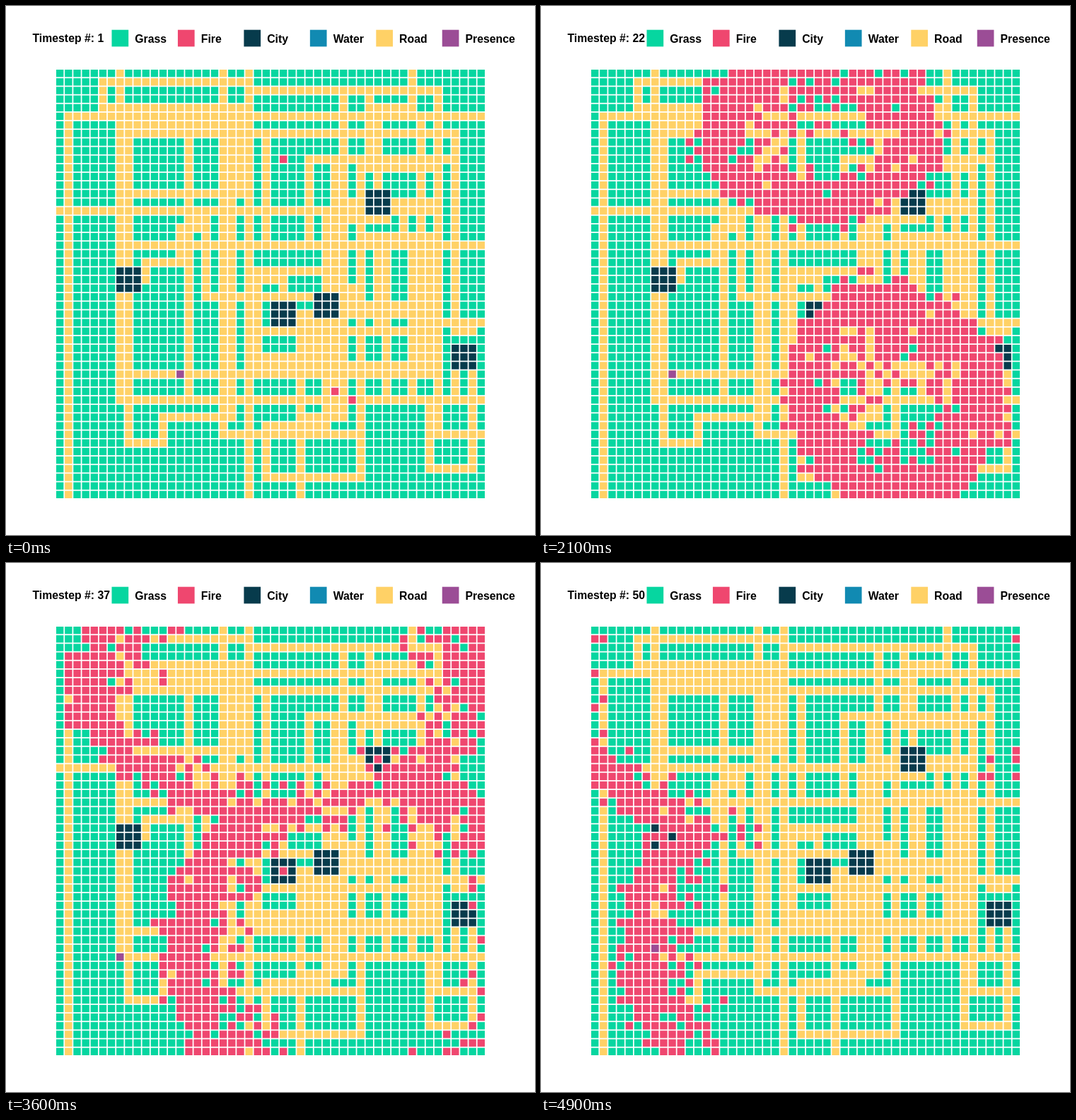
Animation of 748x748 px, one loop 5 s. Source, as an HTML page with a canvas:

```html
<!DOCTYPE html>
<html lang="en">
<head>
<meta charset="utf-8">
<title>Wildfire grid</title>
<style>
  html, body { margin: 0; width: 100%; height: 100%; overflow: hidden; background: #fff; }
  canvas { display: block; }
</style>
</head>
<body>
<canvas id="stage" width="748" height="748"></canvas>
<script>
const ctx = document.getElementById('stage').getContext('2d');
const SIZE = 50, STEP_MS = 100, STEPS = 50;
const PITCH = 12.155, CELL = 10.4, LEFT = 71, TOP = 90;
const COLORS = {
  Grass: '#06d6a0', Fire: '#ef476f', City: '#073b4c',
  Water: '#118ab2', Road: '#ffd166', Presence: '#9b4d96'
};

let state = 20517;
function random() {
  state = (state + 0x6d2b79f5) | 0;
  let x = Math.imul(state ^ (state >>> 15), 1 | state);
  x = (x + Math.imul(x ^ (x >>> 7), 61 | x)) ^ x;
  return ((x ^ (x >>> 14)) >>> 0) / 4294967296;
}
const spread = () => random() + random() - 1;
const lerp = (a, b, k) => a + (b - a) * k;

// Town map: plazas are blocks, roads run through corner points
const land = Array.from({ length: SIZE }, () => Array(SIZE).fill('Grass'));
function fill(kind, x0, y0, x1, y1) {
  for (let y = Math.min(y0, y1); y <= Math.max(y0, y1); y++)
    land[y].fill(kind, Math.min(x0, x1), Math.max(x0, x1) + 1);
}
function road(...p) {
  for (let i = 0; i + 3 < p.length; i += 2) fill('Road', p[i], p[i + 1], p[i + 2], p[i + 3]);
}
const plaza = (...box) => fill('Road', ...box);

// Through roads
road(0, 16, 44, 16);
road(1, 49, 1, 5, 49, 5);
road(7, 0, 7, 38, 49, 38);
road(7, 7, 46, 7, 46, 30, 48, 30);
road(22, 2, 44, 2, 44, 42, 49, 42);
road(19, 0, 19, 42, 35, 42, 35, 10);
road(22, 0, 22, 49);
road(7, 20, 49, 20);
road(7, 35, 44, 35);

// West side
plaza(7, 4, 22, 7);
plaza(19, 4, 21, 14);
road(5, 4, 5, 1, 22, 1);
road(5, 4, 7, 4);
road(8, 4, 8, 43, 12, 43, 12, 40, 20, 40, 20, 4);
road(15, 5, 15, 38);
road(7, 14, 22, 14);
road(15, 17, 17, 17, 17, 26, 35, 26);
road(14, 21, 14, 18, 17, 18);
road(10, 24, 10, 22, 15, 22);

// Centre
plaza(31, 16, 33, 40);
plaza(28, 28, 33, 35);
plaza(22, 33, 27, 35);
road(24, 7, 24, 20);
road(29, 20, 29, 10, 46, 10);
road(32, 16, 32, 10);
road(33, 16, 33, 2);
road(33, 23, 23, 23, 23, 35);
road(22, 23, 22, 24, 26, 24, 26, 25);
road(22, 30, 44, 30);
road(28, 33, 28, 49);
road(33, 40, 28, 40);
road(31, 42, 31, 41, 24, 41, 24, 47, 35, 47, 35, 42);

// East side
plaza(41, 19, 44, 35);
plaza(33, 27, 44, 28);
road(36, 2, 36, 11, 44, 11);
road(36, 4, 41, 4, 41, 0);
road(37, 4, 37, 17, 31, 17);
road(32, 15, 44, 15);
road(40, 15, 40, 19);
road(42, 5, 42, 19, 35, 19);
road(37, 19, 37, 30);
road(38, 15, 38, 17);
road(38, 19, 38, 38);
road(31, 25, 35, 25);
road(41, 29, 49, 29);
road(33, 34, 44, 34);
road(41, 35, 41, 38);
road(43, 38, 43, 46, 48, 46, 48, 35);
road(46, 35, 46, 38);

// Small greens inside the paved area
for (const y of [18, 21, 29, 36]) fill('Grass', 34, y, 34, y + 1);
for (const x of [21, 23]) fill('Grass', x, 17, x, 19);
fill('Grass', 34, 23, 34, 24);
fill('Grass', 34, 30, 34, 30);
road(33, 30, 35, 30);
fill('Grass', 34, 31, 34, 33);

for (const [x, y] of [[36, 14], [7, 23], [25, 27], [30, 26], [46, 32]]) fill('City', x, y, x + 2, y + 2);

// Fire fronts: slower downhill from the north seed, slower westward from the south ones
const north = (d, dx, dy) => 1 + 1.4 * d + 1.3 * Math.max(0, dy);
const south = (d, dx) => 1 + 1.5 * d + Math.min(6, 0.6 * Math.max(0, -dx));
const seeds = [[26, 10, north], [32, 37, south], [34, 38, south]];

const burns = land.map((row, y) => row.map((_, x) => {
  let near = SIZE, start = Infinity;
  for (const [sx, sy, front] of seeds) {
    const dx = x - sx, dy = y - sy, d = Math.hypot(dx, dy);
    near = Math.min(near, d);
    start = Math.min(start, front(d, dx, dy));
  }
  const from = near ? Math.max(1.5, start + spread() * Math.min(3, near / 2)) : 1;
  const length = 9 + 7 * Math.exp(-near / 8) + spread() * 7;
  return { from, to: from + Math.max(1, length) };
}));

// step, column, row
const walk = [[1, 14, 35], [18, 10, 35], [26, 8, 34], [30, 7, 35], [37, 7, 38], [42, 7, 37], [50, 7, 37]];
function walker(step) {
  let i = 0;
  while (i < walk.length - 2 && step >= walk[i + 1][0]) i++;
  const a = walk[i], b = walk[i + 1], k = (step - a[0]) / (b[0] - a[0]);
  return [Math.round(lerp(a[1], b[1], k)), Math.round(lerp(a[2], b[2], k))];
}

function drawCell(kind, x, y) {
  ctx.fillStyle = COLORS[kind];
  ctx.fillRect(LEFT + x * PITCH, TOP + y * PITCH, CELL, CELL);
}

function drawLegend(step) {
  ctx.font = 'bold 15.8px "Liberation Sans", Arial, sans-serif';
  ctx.fillStyle = '#000';
  ctx.fillText('Timestep #: ' + step, 37.5, 50.5);
  Object.keys(COLORS).forEach((name, i) => {
    const x = i * 93.45;
    ctx.fillStyle = COLORS[name];
    ctx.fillRect(149.5 + x, 33.7, 23.7, 23.7);
    ctx.fillStyle = '#000';
    ctx.fillText(name, 182.3 + x, 51.5);
  });
}

function draw(step) {
  ctx.fillStyle = '#fff';
  ctx.fillRect(0, 0, 748, 748);
  drawLegend(step);
  burns.forEach((row, y) => row.forEach(({ from, to }, x) => {
    drawCell(step >= from && step < to ? 'Fire' : land[y][x], x, y);
  }));
  drawCell('Presence', ...walker(step));
}

const begin = performance.now();
let shown = 0;
function tick() {
  const step = Math.floor((performance.now() - begin) / STEP_MS) % STEPS + 1;
  if (step !== shown) draw(shown = step);
  requestAnimationFrame(tick);
}
tick();
</script>
</body>
</html>
```
